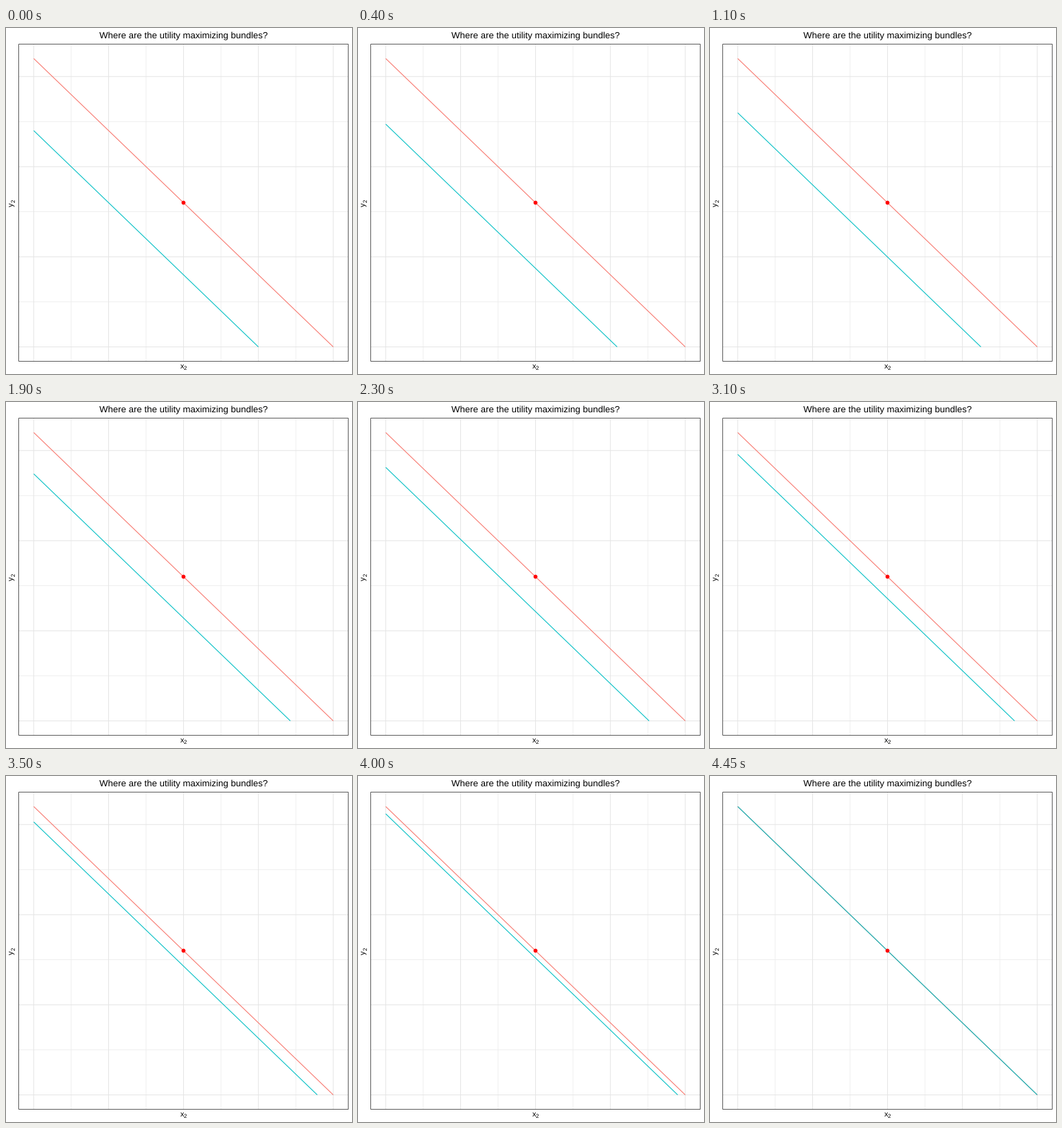
These frames come from a looping animation (504x504 px, 5000 ms). A matplotlib script:

```python
import matplotlib.pyplot as plt
from matplotlib.animation import FuncAnimation
from matplotlib.patches import Circle, Rectangle

SIZE = 504
FRAMES, MOVING = 100, 89
LEFT, RIGHT, TOP, BOTTOM = 18.6, 498.5, 23.5, 485.5
X_MAX, Y_MAX = 40, 32
PAD = 0.05 / 1.1  # margin around the data as a share of the panel

plt.rcParams.update({
    "font.family": "Liberation Sans",
    "text.hinting": "none",
    "path.snap": False,
})


def px(x):
    return LEFT + (RIGHT - LEFT) * (PAD + x / X_MAX / 1.1)


def py(y):
    return BOTTOM - (BOTTOM - TOP) * (PAD + y / Y_MAX / 1.1)


fig = plt.figure(figsize=(SIZE / 72, SIZE / 72), dpi=72, facecolor="white")
ax = fig.add_axes([0, 0, 1, 1])
ax.set(xlim=(0, SIZE), ylim=(SIZE, 0))
ax.axis("off")


def line(xs, ys, color, width, z):
    return ax.plot(xs, ys, color=color, lw=width, zorder=z,
                   solid_capstyle="butt")[0]


def grid(xs, ys, color, width, z):
    for x in xs:
        line([px(x)] * 2, [TOP, BOTTOM], color, width, z)
    for y in ys:
        line([LEFT, RIGHT], [py(y)] * 2, color, width, z)


def label(x, y, text, size, **kw):
    ax.text(x, y, text, fontsize=size, color="black", va="baseline", **kw)


def budget(income):
    """End points of the budget line that meets the x axis at `income`."""
    return [px(0), px(income)], [py(income * Y_MAX / X_MAX), py(0)]


grid(range(5, 40, 10), range(5, 30, 10), "#ebebeb", 0.75, 1)
grid(range(0, 41, 10), range(0, 31, 10), "#e5e5e5", 1.0, 2)

line(*budget(X_MAX), "#F8766D", 1.07, 3)
moving = line(*budget(30), "#00BFC4", 1.07, 4)
ax.add_patch(Circle((px(20), py(16)), 2.9, fc="red", ec="none", zorder=5))
ax.add_patch(Rectangle((LEFT, TOP), RIGHT - LEFT, BOTTOM - TOP, fill=False,
                       ec="#333333", lw=0.8, zorder=6))

label(258.5, 15, "Where are the utility maximizing bundles?", 13.2, ha="center")
label(253.5, 495.5, "x", 11, ha="left")
label(259, 497.5, "2", 8.2, ha="left")
label(11.5, 260, "y", 11, ha="right", rotation=90)
for text in ax.texts[-1:]:
    text.set(va="bottom", ha="left", rotation_mode="anchor")
    text.set_va("baseline")
ax.text(13.5, 254, "2", fontsize=8.2, color="black", rotation=90,
        rotation_mode="anchor", ha="left", va="baseline")


def update(frame):
    moving.set_data(*budget(30 + 10 * min(frame / MOVING, 1)))
    return (moving,)


anim = FuncAnimation(fig, update, frames=FRAMES, interval=50, repeat=True,
                     repeat_delay=0, blit=False)
plt.show()
```
